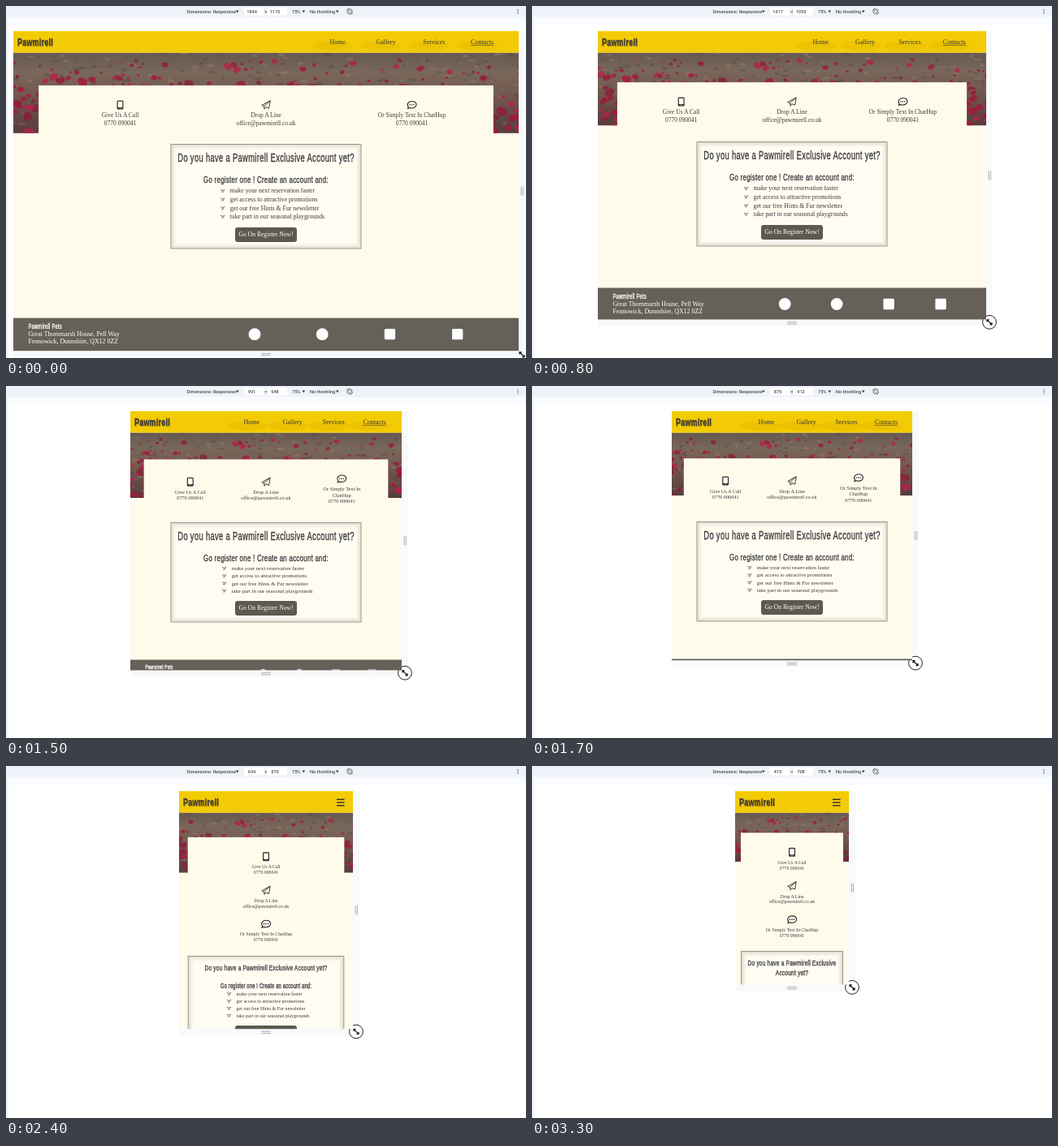
An HTML page for the animation above (3.4 s loop, 640 by 434 pixels).

```html
<!DOCTYPE html>
<html lang="en">
<head>
<meta charset="utf-8">
<title>Responsive page</title>
<style>
  html, body { margin: 0; width: 100%; height: 100%; overflow: hidden; background: #fff; }
  svg { display: block; width: 640px; height: 434px; }
  text { white-space: pre; }
  .ui { font-family: Roboto, "Liberation Sans", sans-serif; fill: #222; }
  .body { font-family: "Liberation Serif", "Noto Serif", serif; }
  .narrow { font-family: "Liberation Sans", Roboto, sans-serif; letter-spacing: .035em; stroke-width: .35; }
</style>
</head>
<body>
<svg viewBox="0 0 640 434" xmlns="http://www.w3.org/2000/svg">
  <defs>
    <linearGradient id="meadow" x2="0" y2="1">
      <stop offset="0" stop-color="#64564f"/>
      <stop offset=".25" stop-color="#78675a"/>
      <stop offset=".5" stop-color="#75594f"/>
      <stop offset="1" stop-color="#563b3d"/>
    </linearGradient>
    <g id="photo"></g>
    <g id="phone">
      <rect x="-4" y="-5.5" width="8" height="11" rx="1.4" fill="#2e2e33"/>
      <rect x="-2.8" y="-4.2" width="5.6" height="7.2" fill="#fffbeb"/>
      <circle cy="4.2" r=".6" fill="#fffbeb"/>
    </g>
    <path id="plane" d="M5.2-5.2 3.6 4.2-.2 2.6-2 5.2-2.4 1.6-5.2.5ZM5.2-5.2-2.4 1.6" fill="none" stroke="#2e2e33" stroke-width=".95" stroke-linejoin="round"/>
    <g id="bubble" fill="#2e2e33">
      <path d="M-4.2 2.6C-7-1-4-4.5 0-4.5S5.6-2.4 5.6-.2 3.2 4 0 4C-1 4-1.9 3.8-2.6 3.5L-5.2 4.6Z" fill="none" stroke="#2e2e33" stroke-width="1.1" stroke-linejoin="round"/>
      <circle cx="-2.4" cy="-.2" r=".8"/><circle cy="-.2" r=".8"/><circle cx="2.4" cy="-.2" r=".8"/>
    </g>
    <path id="bullet" d="M-2.6-1.2Q-1-2.2 0 .2Q.6-2 2.6-1.4M-1.6 1Q0 2.4 1.6.2" fill="none" stroke="#6b5a50" stroke-width=".9"/>
    <path id="arrows" d="M-2.4-2.4 2.4 2.4M-3-.4V-3H-.4M3 .4V3H.4" fill="none" stroke="#111" stroke-width="1.2"/>
    <clipPath id="viewport"><rect id="viewportRect" y="31"/></clipPath>
    <clipPath id="banner"><rect id="bannerRect" y="57.5"/></clipPath>
  </defs>
  <g id="stage"></g>
</svg>
<script>
const LOOP = 3400, SCALE_X = .3378, SCALE_Y = .337, MID = 320, TOP = 31, NAV = 57.5;
const INK = '#3b3a3c', CREAM = '#fffbeb', YELLOW = '#f3cb05', SLATE = '#656158';
const BRAND = 'Pawmirell';

// time, device width, device height
const SIZES = [
  [0, 1844, 1170], [200, 1832, 1166], [500, 1678, 1116], [700, 1486, 1069],
  [1200, 1143, 1001], [1300, 1107, 983], [1700, 875, 912], [1900, 781, 894],
  [2100, 725, 877], [2500, 604, 867], [2800, 512, 849], [3100, 485, 782], [3300, 415, 708]
];

const el = id => document.getElementById(id);

function deviceSize(t) {
  let i = 1;
  while (i < SIZES.length - 1 && SIZES[i][0] < t) i++;
  const [a, b] = [SIZES[i - 1], SIZES[i]];
  const p = Math.min(1, (t - a[0]) / (b[0] - a[0]));
  return [1, 2].map(k => Math.round(a[k] + (b[k] - a[k]) * p));
}

const rect = (x, y, w, h, fill, more = '') =>
  `<rect x="${x}" y="${y}" width="${Math.max(0, w)}" height="${Math.max(0, h)}" fill="${fill}" ${more}/>`;
const line = (x1, y1, x2, y2, color, width) =>
  `<path d="M${x1} ${y1}L${x2} ${y2}" stroke="${color}" stroke-width="${width}"/>`;
const use = (id, x, y) => `<use href="#${id}" x="${x}" y="${y}"/>`;

// y is the vertical middle of the lowercase line; the display face is a condensed grotesque
function text(face, x, y, str, size, { anchor = 'middle', fill = INK, more = '' } = {}) {
  const condensed = face === 'narrow';
  return `<text class="${face}" transform="translate(${x} ${y + size * .32})${condensed ? ' scale(.68 1)' : ''}" font-size="${size}"
    text-anchor="${anchor}" fill="${fill}" ${condensed ? `stroke="${fill}"` : ''} ${more}>${str.replace(/&/g, '&amp;')}</text>`;
}

function poppyField() {
  let seed = 11;
  const rnd = () => (seed = seed * 16807 % 2147483647) / 2147483647;
  const fix = v => v.toFixed(1);
  let out = rect(-330, -52, 660, 104, 'url(#meadow)');
  for (let i = 0; i < 420; i++) {
    out += `<ellipse cx="${fix(rnd() * 640 - 320)}" cy="${fix(rnd() * 100 - 50)}" rx="${fix(1.5 + 4 * rnd())}" ry="${fix(.8 + 1.4 * rnd())}"
      fill="${['#9b8069', '#4c4442', '#6d6a72'][i % 3]}" opacity=".4"/>`;
  }
  for (let i = 0; i < 330; i++) {
    const depth = rnd() ** .8, r = 1.2 + depth * 2 + rnd() ** 2 * 4;
    const x = rnd() * 640 - 320, y = -42 + depth * 92;
    out += `<path transform="translate(${fix(x)} ${fix(y)}) rotate(${(rnd() * 60 - 30) | 0}) scale(${fix(r)})"
      d="M-1.1-.2Q-.9-1-.2-.7Q.5-1.1 1-.3Q1.3.4.5.7Q-.2 1-.8.6Q-1.3.3-1.1-.2Z"
      fill="${['#a5183d', '#87203a', '#b42348', '#961c3c'][i % 4]}" opacity=".82"/>`;
  }
  return out;
}

function toolbar(w, h, idle) {
  const ui = (x, str, anchor = 'start', fill = '#222') => text('ui', x, 6.8, str, 5.6, { anchor, fill });
  const caret = x => `<path d="M${x} 5.4h3.6l-1.8 2.9z" fill="#333"/>`;
  return rect(0, 0, 640, 434, '#fff') + rect(0, 13.5, 640, 10, '#fafbfe') +
    rect(0, 13.5, 3, 421, '#f3f5fa') + rect(0, 0, 640, 13.5, '#eff2f8') +
    rect(293, 2, 24, 9.5, '#fff') + rect(322, 2, 24, 9.5, '#fff') +
    ui(222.5, 'Dimensions: Responsive') + caret(283) +
    ui(302.5, `${w}`, 'middle') + ui(319.7, '×', 'middle') +
    ui(331, `${h}`, 'middle', idle ? '#aaa' : '#222') +
    ui(352, '75%') + caret(364.5) + ui(374, 'No throttling') + caret(406) +
    `<g transform="translate(423 6.7)" fill="none" stroke="#444" stroke-width=".9">
       <rect x="-1.5" y="-3" width="3" height="6" rx=".5" transform="rotate(45)"/>
       <path d="M-3.6-.6A3.6 3.6 0 0 1-.4-3.6M3.6.6A3.6 3.6 0 0 1 .4 3.6"/></g>` +
    [4.4, 6.7, 9].map(y => `<circle cx="630" cy="${y}" r=".65" fill="#444"/>`).join('');
}

function header(left, right, W, mobile, t) {
  let out = '';
  const menu = mobile ? Math.max(0, 40 * (1 - (t - 1950) / 300)) : 0;
  if (menu) {
    out += `<svg x="${left + 5}" y="${NAV}" width="${W - 10}" height="${menu}">` +
      rect(0, 0, W, 50, '#dfbd25', 'opacity=".94"') +
      ['Home', 'Gallery', 'Services', 'Contacts'].map((s, i) =>
        text('body', 16.5, 6.5 + i * 10.6, s, 6.6, { anchor: 'start', more: 'letter-spacing="1.2"' })).join('') + '</svg>';
  }
  out += rect(left, TOP, W, NAV - TOP, YELLOW);
  const logo = { anchor: 'start', more: 'font-weight="700"' };
  out += text('narrow', left + 5.7, 45.5, BRAND, 13, { ...logo, fill: '#c49b08' }) +
    text('narrow', left + 5, 44.8, BRAND, 13, logo);
  if (mobile) {
    for (const y of [41.2, 45, 48.8]) out += line(right - 20, y, right - 10.5, y, INK, 1.4);
    return out;
  }
  const last = right - 20.2 - .0398 * W, step = 40.06 + .0309 * W;
  ['Home', 'Gallery', 'Services', 'Contacts'].forEach((s, i) => {
    const x = last - (3 - i) * step;
    out += `<ellipse cx="${x - 6}" cy="49" rx="25" ry="6" fill="#dcb400" opacity=".35"/>` + text('body', x, 44.5, s, 8);
  });
  return out + line(last - 14, 48.4, last + 14, 48.4, INK, .6);
}

function contacts(y, W, mode) {
  const size = [7.5, 6.3, 5.8][mode];
  const spread = .2995 * W - 6.8;
  const items = [
    ['phone', 'Give Us A Call', '0770 090041'],
    ['plane', 'Drop A Line', 'office@pawmirell.co.uk'],
    mode === 1 ? ['bubble', 'Or Simply Text In', 'ChatHup', '0770 090041'] : ['bubble', 'Or Simply Text In ChatHup', '0770 090041']
  ];
  return items.map(([icon, ...lines], i) => {
    const x = mode === 2 ? MID : MID + (i - 1) * spread;
    const top = y + (mode === 2 ? i * 41.5 : mode === 1 && i < 2 ? 3.7 : 0);
    return use(icon, x, top + 24) +
      lines.map((s, n) => text('body', x, top + 36.8 + n * [9.4, 7.4, 6.7][mode], s, size)).join('');
  }).join('');
}

function signUp(y, W, w, mode) {
  const bw = Math.min(235, .9 * W), x = MID - bw / 2, tiny = w < 640;
  const words = `Do you have a ${BRAND} Exclusive Account yet?`.split(' ');
  const room = bw - 16;
  const cut = !tiny || room >= 153 ? words.length : room >= 137 ? 7 : 6;
  const lines = [words.slice(0, cut), words.slice(cut)].filter(l => l.length);
  const headSize = tiny ? 9.6 : mode === 2 ? 12.9 : 13.8;
  const go = tiny ? 25 + 12 * lines.length : mode === 2 ? 43.5 : 44.7;
  const first = tiny ? go + 10 : [58, 57, 55.5][mode];
  const pitch = [10.6, 9.2, 8.9][mode], size = [7.8, 6.7, 6.05][mode];
  const button = Math.round(first + 3 * pitch + [13.2, 12.4, 12][mode]);
  const height = button + 26.5;

  let out = rect(x, y, bw, height, '#fffcf2');
  for (let i = 0; i < 7; i++)
    out += rect(x + i + .5, y + i + .5, bw - 2 * i - 1, height - 2 * i - 1, 'none',
      `stroke="#77766a" opacity="${i ? .26 * (1 - i / 7) ** 1.3 : .75}"`);
  lines.forEach((l, i) => out += text('narrow', MID, y + (tiny ? 15 : 18) + i * 12, l.join(' '), headSize));
  out += text('narrow', MID, y + go, 'Go register one ! Create an account and:', tiny ? 8.45 : 11.6);
  const center = mode === 2 ? 329 : MID + .023 * W;
  const start = center - [58.5, 50, 45.5][mode];
  ['make your next reservation faster', 'get access to attractive promotions',
    'get our free Hints & Fur newsletter', 'take part in our seasonal playgrounds'].forEach((s, i) => {
    const ly = y + first + i * pitch;
    out += use('bullet', start - 9, ly) + text('body', start, ly, s, size, { anchor: 'start' });
  });
  out += rect(MID - 38, y + button, 76, 18, '#5d5950', 'rx="3.2"') +
    text('body', MID, y + button + 9, 'Go On Register Now!', 7.6, { fill: '#fff' });
  return [out, y + height];
}

function footer(y, left, W, w) {
  const big = w >= 1200, k = big ? 1 : .825, drop = big ? 1 : .88;
  const white = { anchor: 'start', fill: '#fff' };
  let out = rect(left, y, W, 41, SLATE) +
    text('narrow', left + 18.4, y + 11 * drop, `${BRAND} Pets`, 8.6 * k, white) +
    text('body', left + 18.4, y + 20 * drop, 'Great Thornmarsh House, Pell Way', 7.9 * k, white) +
    text('body', left + 18.4, y + 28.7 * drop, 'Fennowick, Dunnshire, QX12 0ZZ', 7.9 * k, white);
  const cy = y + 20 * drop, r = 7.4 * k;
  for (let i = 0; i < 4; i++) {
    const cx = 306 + (622 - W) * .036 + i * .1338 * W;
    out += i < 2 ? `<circle cx="${cx}" cy="${cy}" r="${r}" fill="#fff"/>`
      : rect(cx - r * .9, cy - r * .9, r * 1.8, r * 1.8, '#fff', 'rx="1.5"');
  }
  return out;
}

function handles(right, bottom, left, W, H, idle) {
  const grip = '#a5a8ac', cy = TOP + H / 2;
  let out = rect(right, TOP, 8, H + 8, '#f8f9fb') + rect(left, bottom, W, 8, '#f8f9fb');
  for (const d of [3.2, 5.4]) {
    out += line(right + d, cy - 5.5, right + d, cy + 5.5, grip, .9);
    out += line(MID - 6, bottom + d, MID + 6, bottom + d, grip, .9);
  }
  if (!idle) out += `<circle cx="${right + 4}" cy="${bottom + 3.3}" r="8.4" fill="#fff" stroke="#222"/>`;
  return out + use('arrows', right + 4, bottom + (idle ? 4.6 : 3.3));
}

function setRect(id, x, w, h) {
  for (const [k, v] of Object.entries({ x, width: w, height: h })) el(id).setAttribute(k, v);
}

function render(t) {
  const [w, h] = deviceSize(t);
  const W = 2 * Math.round(w * SCALE_X / 2), H = h * SCALE_Y;
  const left = MID - W / 2, right = MID + W / 2, bottom = TOP + H;
  const mode = w >= 992 ? 0 : w >= 768 ? 1 : 2;
  const bannerH = H * .25 + .75, cardY = NAV + 1 + H * .1;
  const zoom = Math.max(W / 622, bannerH / 99.5);
  setRect('viewportRect', left, W, H);
  setRect('bannerRect', left, W, bannerH);

  const [box, boxEnd] = signUp(Math.round(cardY + [72.5, 77.5, 146][mode]), W, w, mode);
  const footY = Math.max(bottom - 40.6, boxEnd + (mode ? 46 : 51));
  el('stage').innerHTML = toolbar(w, h, t === 0) + handles(right, bottom, left, W, H, t === 0) +
    `<g clip-path="url(#viewport)">` + rect(left, TOP, W, H, CREAM) +
    `<g clip-path="url(#banner)"><use href="#photo" transform="translate(${MID} ${NAV + bannerH / 2}) scale(${zoom})"/></g>` +
    rect(left + W * .05, cardY, W * .9, bottom - cardY, CREAM) +
    contacts(cardY, W, mode) + box + footer(footY, left, W, w) +
    header(left, right, W, mode === 2, t) + '</g>';
}

el('photo').innerHTML = poppyField();
const begin = performance.now();
let shown = -1;
function tick() {
  const step = Math.floor((performance.now() - begin) % LOOP / 100) * 100;
  const t = step < 200 ? 0 : step;
  if (t !== shown) render(shown = t);
  requestAnimationFrame(tick);
}
tick();
</script>
</body>
</html>
```
